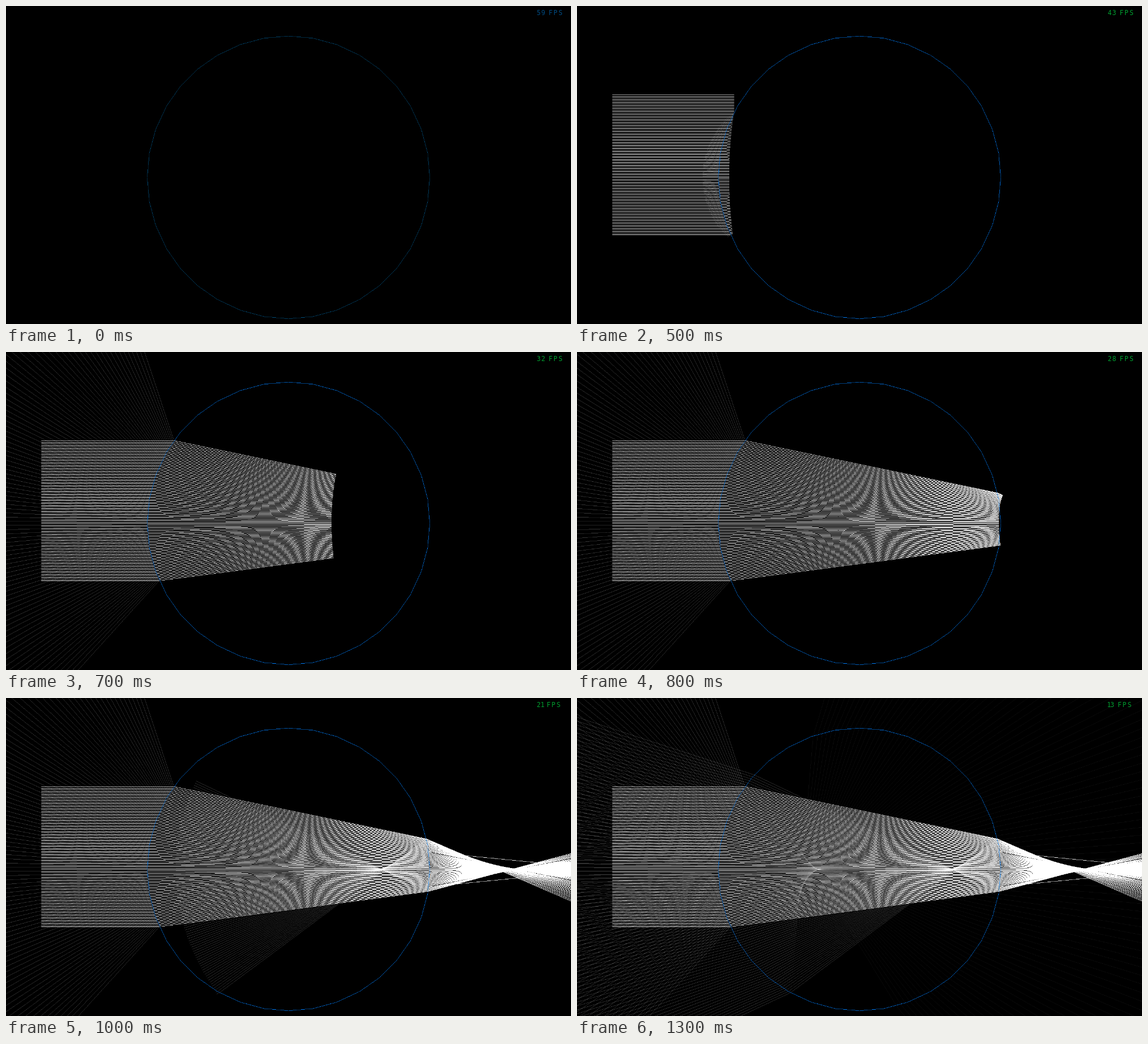
Recreate the animation shown at these times as an HTML page with a canvas. Size 998 by 561 pixels, loop 1.4 s.

```html
<!DOCTYPE html>
<html lang="en">
<head>
<meta charset="utf-8">
<title>Light through a disc</title>
<style>
html, body { margin: 0; width: 100%; height: 100%; overflow: hidden; background: #000; }
canvas, svg { position: absolute; left: 0; top: 0; width: 998px; height: 561px; }
text { font: 11.5px "DejaVu Sans Mono", "Liberation Mono", monospace; white-space: pre; }
</style>
</head>
<body>
<canvas id="stage" width="998" height="561"></canvas>
<svg viewBox="0 0 998 561"><text id="fps" y="16"></text></svg>
<script>
const STEP = 100, LOOP = 1400;

// The scene is traced at full size, then scaled down to the stage
const W = 1600, H = 900;
const CX = 800, CY = 485, R = 400;
const INDEX = 1.43, REFLECT = 0.24, FAINT = 0.02;
const RAYS = 100, START_X = 100, TOP = 251, GAP = 4;

// Optical path covered and frame rate at each step
const reach = [0, 0, 0, 0, 0, 345, 688, 1047, 1437, 1917, 2473, 3080, 3740, 4450];
const rates = [59, 41, 30, 22, 33, 43, 37, 32, 28, 24, 21, 18, 15, 13];

const stage = document.getElementById('stage');
const ctx = stage.getContext('2d');
const label = document.getElementById('fps');
const scene = document.createElement('canvas');
scene.width = W;
scene.height = H;
const sceneCtx = scene.getContext('2d');
const image = sceneCtx.createImageData(W, H);
const px = image.data;

function plot(x, y, color, alpha) {
  if (x < 0 || y < 0 || x >= W || y >= H) return;
  const i = (Math.floor(y) * W + Math.floor(x)) * 4;
  for (let k = 0; k < 3; k++) px[i + k] += (color[k] - px[i + k]) * alpha;
}

// Hard-edged line, one pixel per step of the longer axis
function line(x0, y0, x1, y1, color, alpha) {
  const dx = x1 - x0, dy = y1 - y0;
  const n = Math.max(1, Math.round(Math.max(Math.abs(dx), Math.abs(dy))));
  for (let i = 0; i < n; i++) plot(x0 + dx * i / n, y0 + dy * i / n, color, alpha);
}

const WHITE = [255, 255, 255];

function refract(dx, dy, nx, ny, eta) {
  const c = -(dx * nx + dy * ny);
  const k = 1 - eta * eta * (1 - c * c);
  if (k < 0) return null;
  const m = eta * c - Math.sqrt(k);
  return [eta * dx + m * nx, eta * dy + m * ny];
}

function bounce(dx, dy, nx, ny) {
  const d = 2 * (dx * nx + dy * ny);
  return [dx - d * nx, dy - d * ny];
}

function leave(x, y, d, path, alpha) {
  const len = Math.min(path, 2000);
  line(x, y, x + d[0] * len, y + d[1] * len, WHITE, alpha);
}

function inside(x, y, d, path, alpha, straight) {
  if (alpha < FAINT || path <= 0) return;
  const chord = -2 * ((x - CX) * d[0] + (y - CY) * d[1]);
  const len = Math.min(chord, path / INDEX);
  const ex = x + d[0] * len, ey = y + d[1] * len;
  line(x, y, ex, ey, WHITE, alpha);
  if (len < chord) return;
  const nx = (CX - ex) / R, ny = (CY - ey) / R;
  const rest = path - chord * INDEX;
  const out = straight ? d : refract(d[0], d[1], nx, ny, INDEX);
  if (out) leave(ex, ey, out, rest, alpha);
  inside(ex, ey, bounce(d[0], d[1], nx, ny), rest, alpha * REFLECT, false);
}

function ray(y, path) {
  const h = y - CY;
  const hit = CX - Math.sqrt(R * R - h * h);
  const end = Math.min(hit, START_X + path);
  line(START_X, y, end, y, WHITE, 1);
  if (end < hit) return;
  const rest = path - (hit - START_X);
  const nx = (hit - CX) / R, ny = h / R;
  leave(hit, y, bounce(1, 0, nx, ny), rest, REFLECT);
  // Two narrow bands pass the far side without bending
  const straight = Math.abs(Math.abs(h) - 125) < 3;
  inside(hit, y, refract(1, 0, nx, ny, 1 / INDEX), rest, 1, straight);
}

function ring(color) {
  const at = k => [CX + R * Math.sin(k * Math.PI / 18), CY + R * Math.cos(k * Math.PI / 18)];
  for (let k = 0; k < 36; k++) line(...at(k), ...at(k + 1), color, 1);
}

function showRate(rate, color) {
  const xs = [];
  let x = 937.5;
  for (const c of String(rate)) {
    xs.push(c === '1' ? x - 1.2 : x);
    x += c === '1' ? 4.5 : 8;
  }
  xs.push(x, x + 5, x + 13.5, x + 22.5);
  label.setAttribute('x', xs.join(' '));
  label.setAttribute('fill', color);
  label.textContent = rate + ' FPS';
}

function draw(step) {
  for (let i = 0; i < px.length; i += 4) {
    px[i] = px[i + 1] = px[i + 2] = 0;
    px[i + 3] = 255;
  }
  const path = reach[step];
  if (path > 0) {
    for (let i = 0; i < RAYS; i++) ray(TOP + GAP * i, path);
  }
  ring(step ? [0, 121, 241] : [0, 76, 120]);
  sceneCtx.putImageData(image, 0, 0);
  ctx.imageSmoothingQuality = 'low';
  ctx.drawImage(scene, 0, 0, stage.width, stage.height);
  showRate(rates[step], step ? '#009e2f' : '#004a80');
}

let shown = -1;
const begin = performance.now();
function tick() {
  const step = Math.floor((performance.now() - begin) % LOOP / STEP);
  if (step !== shown) draw(shown = step);
  requestAnimationFrame(tick);
}
tick();
</script>
</body>
</html>
```
